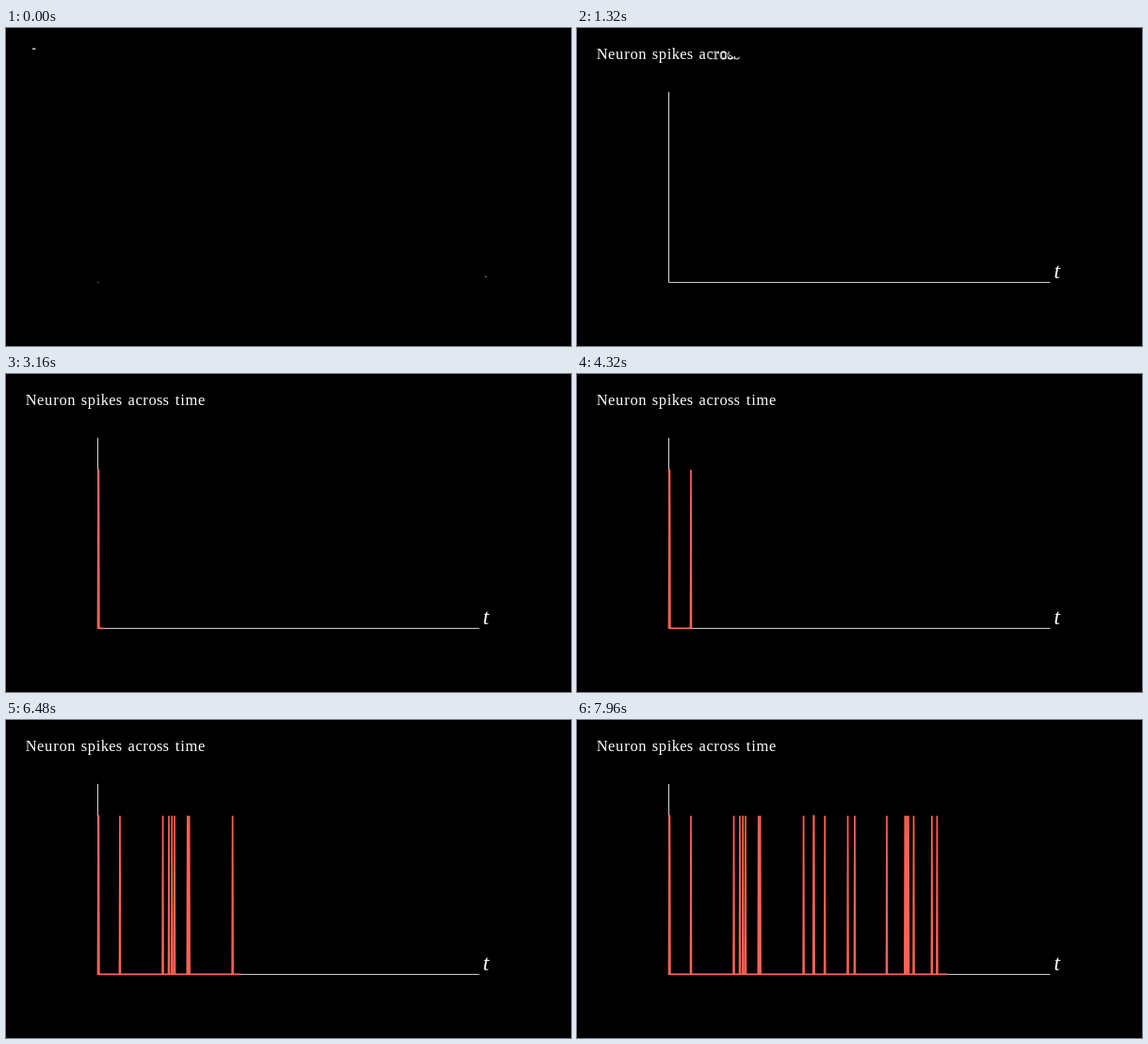
An HTML page that plays this animation: 600 px wide and 338 px high, repeating every 8 s.

```html
<!DOCTYPE html>
<html lang="en">
<head>
<meta charset="utf-8">
<title>Neuron spikes across time</title>
<style>
  html, body { margin: 0; width: 100%; height: 100%; overflow: hidden; background: #000; }
  svg { display: block; width: 100%; height: 100%; }
  text { font-family: "Liberation Serif", "Times New Roman", serif; fill: #fff; stroke: #fff; }
  .axis { stroke: #fff; stroke-width: 0.85; fill: none; }
  #trace { stroke: #fc6255; stroke-width: 1.7; stroke-linejoin: bevel; fill: none; }
</style>
</head>
<body>
<svg viewBox="0 0 600 338">
  <g id="title" font-size="16.5"></g>
  <line id="xAxis" class="axis"/>
  <line id="yAxis" class="axis"/>
  <text id="label" x="506.6" y="266.3" font-size="23.5" font-style="italic">t</text>
  <path id="trace"/>
</svg>
<script>
const LOOP = 8000, STEP = 40, LEAD = 1000 / 60;
const ORIGIN = { x: 97.5, y: 270.4 }, WIDTH = 405, HEIGHT = 202.5, PEAK = HEIGHT / 1.2;
const SAMPLES = 880;
const SPIKES = new Set([1, 2, 51, 150, 164, 171, 177, 207, 211, 311, 334, 335, 360,
  413, 429, 503, 545, 549, 553, 565, 607, 619]);

const byId = id => document.getElementById(id);
const clamp = v => Math.min(1, Math.max(0, v));
const sigmoid = v => 1 / (1 + Math.exp(-v));
const smooth = v => {
  const edge = sigmoid(-5);
  return clamp((sigmoid(10 * (clamp(v) - 0.5)) - edge) / (1 - 2 * edge));
};

// Advance of each letter in em, for a wide book face
const ADVANCE = { N: .75, e: .444, u: .556, r: .392, o: .5, n: .556, s: .394, p: .556,
  i: .278, k: .528, a: .5, c: .444, t: .389, m: .833, ' ': .333 };

function buildTitle(words, x, y, em) {
  const letters = [];
  for (const ch of words) {
    const advance = ADVANCE[ch] * em;
    if (ch !== ' ') {
      const node = document.createElementNS('http://www.w3.org/2000/svg', 'text');
      node.textContent = ch;
      node.setAttribute('x', x + advance / 2);
      node.setAttribute('y', y);
      node.setAttribute('text-anchor', 'middle');
      byId('title').append(node);
      letters.push({ node, outline: advance * 5 });
    }
    x += advance;
  }
  return letters;
}

// First half traces the outline, second half fades it into the fill
function writeGlyph(node, outline, progress) {
  const drawn = clamp(progress * 2), fill = clamp(progress * 2 - 1);
  node.style.visibility = progress > 0 ? 'visible' : 'hidden';
  node.style.fillOpacity = fill;
  node.style.strokeWidth = 0.85 * (1 - fill);
  node.style.stroke = fill < 1 ? '#fff' : 'none';
  node.style.strokeDasharray = drawn < 1 ? `${outline * drawn} 999` : 'none';
}

function drawAxis(node, dx, dy) {
  node.setAttribute('x1', ORIGIN.x);
  node.setAttribute('y1', ORIGIN.y);
  node.setAttribute('x2', ORIGIN.x + dx);
  node.setAttribute('y2', ORIGIN.y + dy);
}

const level = i => SPIKES.has(i) ? 1 : 0;

function tracePath(position) {
  if (position <= 0) return '';
  const point = (i, v) =>
    `${(ORIGIN.x + i * WIDTH / SAMPLES).toFixed(3)} ${(ORIGIN.y - v * PEAK).toFixed(3)}`;
  const last = Math.floor(position), part = position - last;
  const points = [];
  for (let i = 0; i <= last; i++) points.push(point(i, level(i)));
  points.push(point(position, level(last) * (1 - part) + level(last + 1) * part));
  return 'M' + points.join('L');
}

const letters = buildTitle('Neuron spikes across time', 20.3, 32.9, 16.82);
const lag = 4 / (letters.length + 1);
const span = (letters.length - 1) * lag + 1;

function render(ms) {
  const time = (Math.floor(ms % LOOP / STEP) * STEP + LEAD) / 1000;
  letters.forEach(({ node, outline }, i) =>
    writeGlyph(node, outline, clamp(time / 2 * span - i * lag)));
  writeGlyph(byId('label'), 40, clamp(time));
  const grown = smooth(time);
  drawAxis(byId('xAxis'), WIDTH * grown, 0);
  drawAxis(byId('yAxis'), 0, -HEIGHT * grown);
  byId('trace').setAttribute('d', tracePath(SAMPLES * smooth((time - 2) / 10)));
}

function tick() {
  render(performance.now());
  requestAnimationFrame(tick);
}
tick();
</script>
</body>
</html>
```
